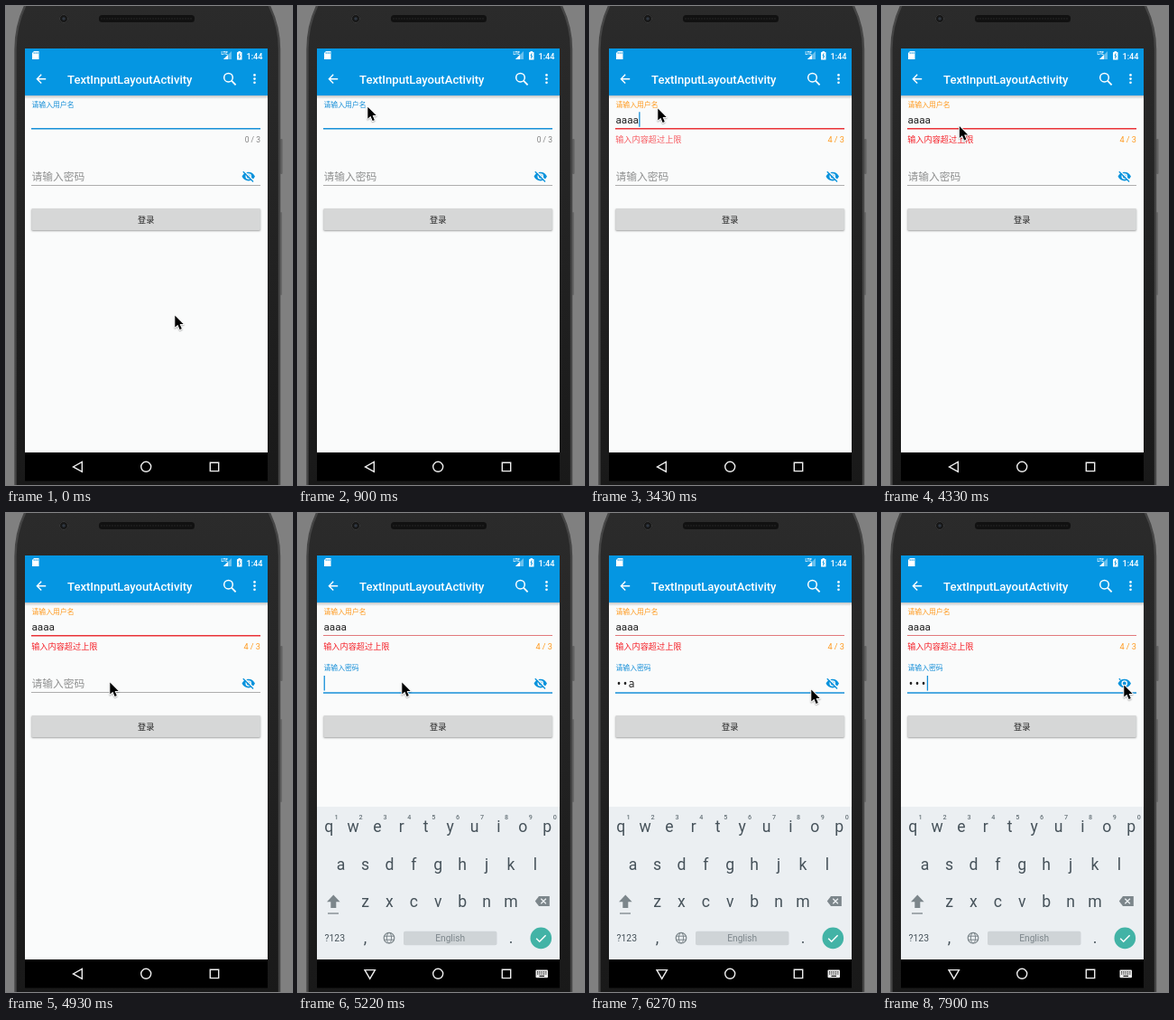
Animation, 317 px wide and 530 px high, one loop 8000 ms. Source, as an HTML page with a canvas:

```html
<!DOCTYPE html>
<html lang="zh">
<head>
<meta charset="utf-8">
<title>Text input demo</title>
<style>
html, body { margin: 0; width: 100%; height: 100%; overflow: hidden; background: #808080; }
canvas { display: block; width: 317px; height: 530px; }
</style>
</head>
<body>
<canvas id="stage"></canvas>
<script>
const W = 317, H = 530, LOOP = 8000, STEP = 149.06;
const canvas = document.getElementById('stage');
const dpr = window.devicePixelRatio || 1;
canvas.width = W * dpr;
canvas.height = H * dpr;
const ctx = canvas.getContext('2d');

const FONT = 'Roboto, "Noto Sans CJK SC", "Noto Sans CJK", sans-serif';
const MONO = '"Noto Sans Mono", "DejaVu Sans Mono", monospace';
const BLUE = '#0596e2', ACCENT = '#168fd8', RED = '#f5222a', ORANGE = '#ff9a1f', PAPER = '#fafbfb';
const DP = 0.6545, MID = 155.2;

// What the user does, in ms
const nameKeys = [2500, 2800, 2950, 3370];
const passKeys = [5340, 5490, 5720];
const FOCUS_PASS = 5200, REVEAL = 6850, CONCEAL = 7880;
const caretResets = [-870, ...nameKeys, FOCUS_PASS, ...passKeys, REVEAL, CONCEAL];
const moves = [
  { from: 300, to: 900, x: 76, y: 110 },
  { from: 1340, to: 1640, x: 74, y: 112 },
  { from: 4030, to: 4900, x: 114, y: 186 },
  { from: 5670, to: 6260, x: 244, y: 194 },
  { from: 6260, to: 6850, x: 267, y: 189 }
];

const clamp = v => Math.min(1, Math.max(0, v));
const ease = v => v * v * (3 - 2 * v);
const pressed = (keys, t) => keys.filter(key => key <= t).length;

function mouseAt(t) {
  let x = 186, y = 341;
  for (const move of moves) {
    const k = ease(clamp((t - move.from) / (move.to - move.from)));
    x += (move.x - x) * k;
    y += (move.y - y) * k;
  }
  return [x + 0.5, y];
}

function caretOn(t) {
  const reset = caretResets[pressed(caretResets, t) - 1];
  return Math.floor((t - reset) / 500) % 2 === 0;
}

// The newest character stays readable for a moment before it is masked
function passwordAt(t) {
  const count = pressed(passKeys, t);
  if (!count || (t >= REVEAL && t < CONCEAL)) return 'a'.repeat(count);
  const fresh = t < REVEAL && t - passKeys[count - 1] < 1500;
  return '•'.repeat(count - 1) + (fresh ? 'a' : '•');
}

function slashAt(t) {
  return t < CONCEAL ? clamp(1 - (t - REVEAL) / 250) : clamp((t - CONCEAL) / 150);
}

function rect(x, y, w, h, fill, r = 0) {
  ctx.fillStyle = fill;
  ctx.beginPath();
  ctx.roundRect(x, y, w, h, r);
  ctx.fill();
}

function disc(x, y, r, fill) {
  ctx.fillStyle = fill;
  ctx.beginPath();
  ctx.arc(x, y, r, 0, 7);
  ctx.fill();
}

function ring(x, y, rx, color, width, ry = rx) {
  ctx.strokeStyle = color;
  ctx.lineWidth = width;
  ctx.beginPath();
  ctx.ellipse(x, y, rx, ry, 0, 0, 7);
  ctx.stroke();
}

function line(path, color, width) {
  ctx.strokeStyle = color;
  ctx.lineWidth = width;
  ctx.stroke(new Path2D(path));
}

function shape(path, fill) {
  ctx.fillStyle = fill;
  ctx.fill(new Path2D(path), 'evenodd');
}

function text(str, x, y, size, color, align = 'left', weight = 400, family = FONT) {
  ctx.font = `${weight} ${size}px ${family}`;
  ctx.textAlign = align;
  ctx.fillStyle = color;
  ctx.fillText(str, x, y);
}

function gradient(y0, y1, from, to) {
  const g = ctx.createLinearGradient(0, y0, 0, y1);
  g.addColorStop(0, from);
  g.addColorStop(1, to);
  return g;
}

function drawPhone() {
  const body = 'M22-2C16 10 10.5 26 10.5 48V532H303V48C303 26 297 10 291-2Z';
  rect(0, 0, W, H, '#808080');
  rect(304, 147, 2.5, 39, '#626262', 1);
  rect(304, 228, 2, 92, '#686868', 1);
  shape(body, gradient(0, H, '#2b2b2b', '#191919'));
  line(body, '#454545', 2.4);
  disc(64, 14, 5, '#171717');
  ring(64, 14, 4.5, '#3a3a3a', 1);
  disc(64, 14, 1.8, '#303842');
  rect(103, 10, 106, 8, '#111', 3.5);
  for (let x = 106; x < 207; x += 3) disc(x, 14, 0.8, '#292929');
  rect(21, 47, 269, 478, PAPER);
}

function drawStatus() {
  shape('M31 50h5.5v9H29v-7z', '#fff');
  for (let x = 31; x < 36; x += 2) rect(x - 0.3, 51, 0.8, 2, BLUE);
  shape('M250 50v9h-9z', 'rgba(255,255,255,.4)');
  shape('M246 54v5h-5z', '#fff');
  text('LTE', 238.5, 53.5, 4.5, '#fff', 'left', 700);
  rect(256, 51, 5.5, 8.5, '#fff', 0.6);
  rect(257.5, 50, 2.5, 1.5, '#fff');
  line('M259.2 52.4l-1.2 2.8h1.6l-1.2 2.8', BLUE, 1);
  text('1:44', 284.5, 58.5, 14 * DP, '#fff', 'right', 500);
}

function drawToolbar() {
  rect(21, 99, 269, 4, gradient(99, 103, 'rgba(0,0,0,.22)', 'rgba(0,0,0,0)'));
  rect(21, 47, 269, 52, BLUE);
  drawStatus();
  line('M44.2 80.7H34.8M39.2 75.8l-4.8 4.9 4.8 4.9', '#fff', 1.4);
  text('TextInputLayoutActivity', 68, 85.6, 20 * DP, '#fff', 'left', 500);
  ring(246.5, 79.2, 4.8, '#fff', 1.5);
  line('M250 82.7l4.6 4.6', '#fff', 1.8);
  for (let i = -1; i <= 1; i++) disc(275.5, 80.6 + i * 4.2, 1.3, '#fff');
}

function drawNavigation(keyboard) {
  rect(21, 494, 269, 31.5, '#000');
  line(keyboard ? 'M74 505.6h11.4l-5.7 9.8z' : 'M84.3 504.4v11l-9.8-5.5z', '#eee', 1.4);
  ring(MID, 509.8, 5.5, '#eee', 1.4);
  line('M226.3 505.2h9.4v9.4h-9.4z', '#eee', 1.4);
  if (!keyboard) return;
  rect(263.5, 505.5, 13.5, 8.8, '#eee', 1);
  for (let x = 265; x < 276; x += 2.3) {
    for (let y = 507.2; y < 510; y += 2.2) rect(x, y, 1.2, 1.2, '#000');
  }
  rect(267.5, 511.8, 5.5, 1.1, '#000');
}

function drawEye(slash) {
  ctx.save();
  ctx.translate(260.9, 180.7);
  ctx.scale(DP, DP);
  shape('M12 4.5C7 4.5 2.7 7.6 1 12c1.7 4.4 6 7.5 11 7.5s9.3-3.1 11-7.5c-1.7-4.4-6-7.5-11-7.5z' +
    'M12 17a5 5 0 1 1 0-10 5 5 0 1 1 0 10zM12 9a3 3 0 1 0 0 6 3 3 0 1 0 0-6z', '#0a93dc');
  if (slash) {
    const reach = 17.2 * slash;
    line(`M4.4 2.6l${reach} ${reach}`, PAPER, 2.2);
    line(`M2.9 3.9l${reach} ${reach}`, '#0a93dc', 2);
  }
  ctx.restore();
}

function drawValue(value, baseline, caret, family) {
  text(value, 28.4, baseline, 18 * DP, '#212121', 'left', 400, family);
  if (caret) rect(28.6 + ctx.measureText(value).width, baseline - 13.2, 1.3, 16.6, ACCENT);
}

function drawName(t, focused) {
  const name = 'a'.repeat(pressed(nameKeys, t));
  const over = name.length > 3;
  const lineColor = !over ? ACCENT : focused ? '#ea3338' : '#e2797c';
  text('请输入用户名', 28.5, 111.6, 12 * DP, over ? ORANGE : ACCENT);
  drawValue(name, 130.4, focused && caretOn(t), FONT);
  rect(28, 135, 254, focused ? 1.6 : 0.9, lineColor);
  if (over) {
    ctx.globalAlpha = clamp(0.5 + (t - nameKeys[3]) / 250);
    text('输入内容超过上限', 28.2, 150.6, 14 * DP, RED);
    ctx.globalAlpha = 1;
  }
  text(`${name.length} / 3`, 282, 151, (over ? 14 : 13) * DP, over ? ORANGE : '#808080', 'right');
}

function drawPassword(t, focused) {
  if (focused) {
    text('请输入密码', 28.5, 173.9, 12 * DP, ACCENT);
    drawValue(passwordAt(t), 193.2, caretOn(t), MONO);
  } else {
    text('请输入密码', 28.5, 192.6, 18 * DP, '#8f9090');
  }
  rect(28, 198.2, 254, focused ? 1.6 : 0.9, focused ? ACCENT : '#949595');
  drawEye(slashAt(t));
}

function drawButton() {
  ctx.save();
  ctx.shadowColor = 'rgba(0,0,0,.35)';
  ctx.shadowBlur = 2 * dpr;
  ctx.shadowOffsetY = dpr;
  rect(28.3, 224, 253.6, 24, '#d6d7d7', 1.2);
  ctx.restore();
  text('登录', MID, 239.5, 14 * DP, '#212121', 'center', 500);
}

function drawKeyboard() {
  const paper = '#ebeff2', ink = '#46525a', soft = '#7c868b', pitch = 26.9;
  rect(21, 325, 269, 169, paper);
  ['qwertyuiop', 'asdfghjkl', 'zxcvbnm'].forEach((letters, row) => {
    [...letters].forEach((letter, i) => {
      const x = MID + (i - (letters.length - 1) / 2) * pitch;
      text(letter, x, 353.2 + row * 41.3, 17.6, ink, 'center');
      if (row === 0) text((i + 1) % 10, x + 8.5, 338.6, 7.2, '#68747a', 'center', 500);
    });
  });

  shape('M39.3 422.5l7.3 7.7h-4.3v6.8h-6v-6.8H32z', soft);
  rect(33, 442.4, 12, 1.3, soft);
  shape('M262.8 429.5l4.2-5.5h11.8v11H267z', soft);
  line('M269.3 426.7l5.6 5.6m0-5.6l-5.6 5.6', paper, 1.3);

  text('?123', 40.8, 474.2, 10.4, ink, 'center');
  text(',', 74.5, 475.5, 17.6, ink, 'center');
  text('.', 236, 475.5, 17.6, ink, 'center');
  ring(101, 470.2, 5.8, soft, 1.2);
  ring(101, 470.2, 2.6, soft, 1, 5.8);
  line('M95.8 468.2h10.4m0 4H95.8', soft, 1);
  rect(117, 462.7, 103.5, 15.6, '#cfd4d7', 2);
  text('English', 168.7, 474, 10.2, '#7d878c', 'center');
  disc(269.3, 470.4, 11.8, '#42b3a6');
  line('M264.2 470.8l3.5 3.4 6.9-7', '#fff', 1.5);
}

function drawMouse(x, y) {
  const arrow = 'M.8 1.6v13l3.1-2.8 2.2 5.2 2.2-.9L6.1 11h4.1z';
  ctx.save();
  ctx.translate(x, y);
  ctx.lineJoin = 'round';
  ctx.shadowColor = 'rgba(0,0,0,.3)';
  ctx.shadowBlur = 1.5 * dpr;
  ctx.shadowOffsetY = dpr;
  line(arrow, '#fff', 1.8);
  ctx.shadowColor = 'transparent';
  shape(arrow, '#000');
  ctx.restore();
}

function render(time) {
  // The screen refreshes at a fixed coarse cadence
  const t = Math.floor((time + 5) / STEP) * STEP;
  const inPassword = t >= FOCUS_PASS;
  ctx.setTransform(dpr, 0, 0, dpr, 0, 0);
  drawPhone();
  drawToolbar();
  drawName(t, !inPassword);
  drawPassword(t, inPassword);
  drawButton();
  if (inPassword) drawKeyboard();
  drawNavigation(inPassword);
  drawMouse(...mouseAt(t));
}

const start = performance.now();
function tick() {
  render((performance.now() - start) % LOOP);
  requestAnimationFrame(tick);
}
tick();
</script>
</body>
</html>
```
